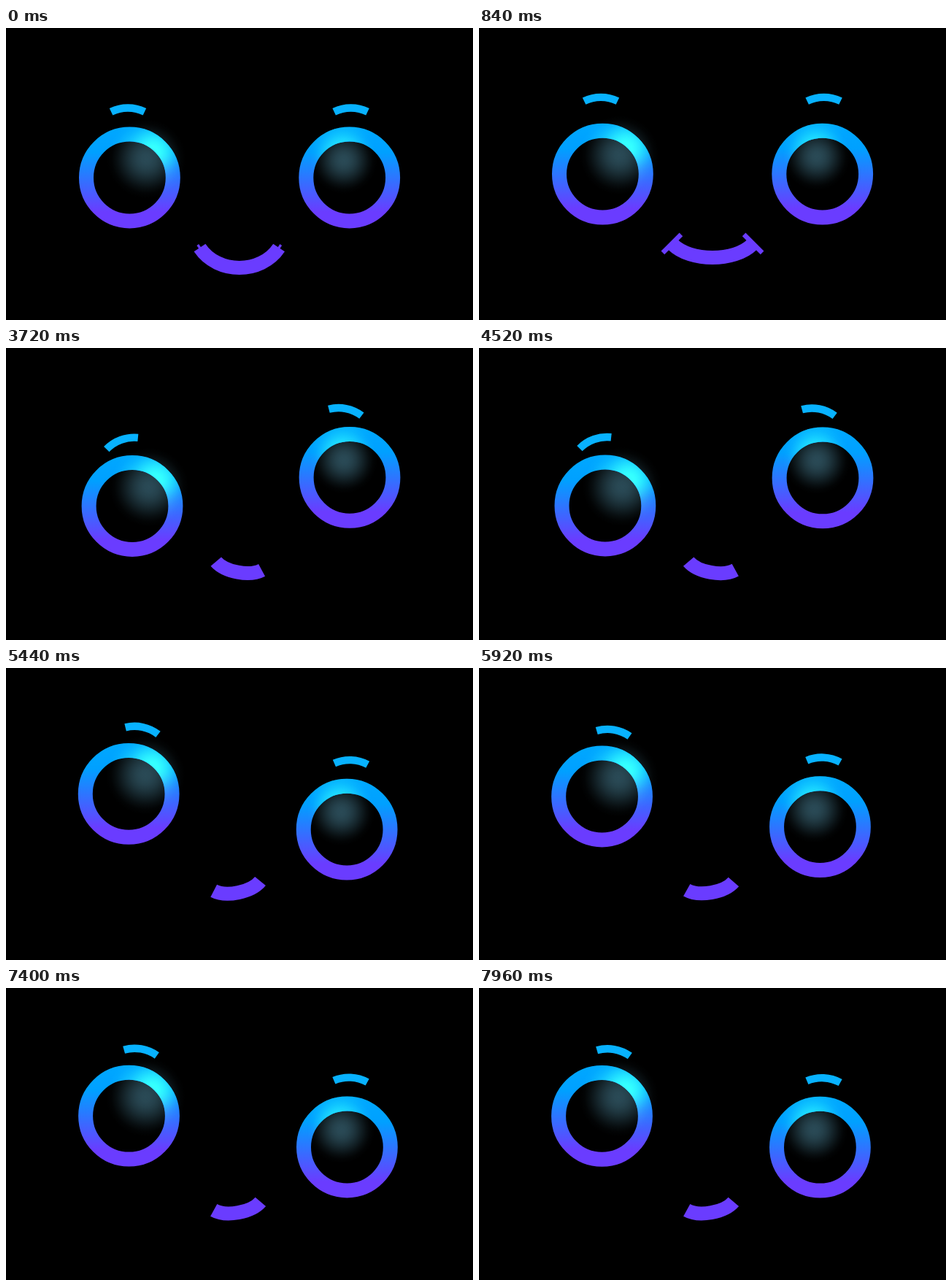
An HTML page with a canvas that plays this animation: 640 px wide and 400 px high, repeating every 8000 ms.

```html
<!DOCTYPE html>
<html lang="en">
<head>
<meta charset="utf-8">
<title>Face</title>
<style>
  html, body { margin: 0; width: 100%; height: 100%; overflow: hidden; background: #000; }
  canvas { display: block; width: 100%; height: 100%; }
</style>
</head>
<body>
<canvas id="stage" width="640" height="400"></canvas>
<script>
const ctx = document.getElementById('stage').getContext('2d');
const LOOP = 8000;
const RAD = Math.PI / 180;
const VIOLET = '#6a3cff';

// eye: x, y; brow: x, y, degrees; mouth: x, y, degrees, half width, control inset, control depth
const rest = {
  eyeL: [169.4, 205], eyeR: [470.7, 205],
  browL: [167, 110.2, 0], browR: [472.6, 110.2, 0],
  mouth: [319.8, 301, 0, 54.3, 24.5, 36.7]
};
const raised = {
  eyeL: [169.4, 200], eyeR: [470.7, 200],
  browL: [167, 95.2, 0], browR: [472.6, 95.2, 0],
  mouth: [320, 296.5, 0, 54.5, 24, 24]
};
const tiltLeft = {
  eyeL: [172.9, 216], eyeR: [471, 178],
  browL: [158, 125.5, -19.5], browR: [466, 84, 10.8],
  mouth: [319.2, 298.4, 10.2, 32.6, 15, 12.2]
};
const tiltRight = {
  eyeL: [168.5, 175.4], eyeR: [467.4, 218.2],
  browL: [185, 84.6, 9.8], browR: [472.5, 123.8, 2.8],
  mouth: [316.8, 298.6, -10.2, 32.6, 15, 12.2]
};

const clamp = v => Math.min(1, Math.max(0, v));
const cubicOut = p => 1 - (1 - p) ** 3;
function elasticOut(p) {
  if (p <= 0 || p >= 1) return p;
  return 1 + 2 ** (-10 * p) * Math.sin((p - 0.15) * 2 * Math.PI / 0.6);
}

const steps = [
  { pose: raised, at: 0, mouthEase: cubicOut, mouthTime: 800 },
  { pose: tiltLeft, at: 3120, mouthEase: elasticOut, mouthTime: 1500 },
  { pose: tiltRight, at: 5180, mouthEase: elasticOut, mouthTime: 1500 }
];

function partAt(name, t) {
  let value = rest[name];
  for (const s of steps) {
    const isMouth = name === 'mouth';
    const time = isMouth ? s.mouthTime : 1500;
    const ease = isMouth ? s.mouthEase : elasticOut;
    const k = ease(clamp((t - s.at) / time));
    value = value.map((v, i) => v + (s.pose[name][i] - v) * k);
  }
  return value;
}

function radial(x, y, r, rgb, alpha) {
  const g = ctx.createRadialGradient(x, y, 0, x, y, r);
  for (let i = 0; i <= 8; i++) {
    const d = i / 8;
    const a = alpha * (1 - d * d) ** 2;
    g.addColorStop(d, `rgba(${rgb},${a})`);
  }
  return g;
}

function eye([x, y], lift, shine, glow) {
  ctx.save();
  ctx.translate(x, y - lift);
  const g = ctx.createLinearGradient(0, -69, 0, 69);
  g.addColorStop(0, '#00a8ff');
  g.addColorStop(0.25, '#00a0ff');
  g.addColorStop(0.84, VIOLET);
  ctx.lineWidth = 20;
  ctx.beginPath();
  ctx.arc(0, 0, 59.4, 0, 2 * Math.PI);
  ctx.strokeStyle = g;
  ctx.stroke();
  ctx.strokeStyle = radial(...shine);
  ctx.stroke();
  ctx.globalCompositeOperation = 'lighter';
  ctx.fillStyle = radial(...glow);
  ctx.fillRect(-80, -90, 160, 160);
  ctx.restore();
}

function brow([x, y, deg], lift) {
  ctx.save();
  ctx.translate(x, y - lift);
  ctx.rotate(deg * RAD);
  ctx.beginPath();
  ctx.arc(0, 52.3, 52.9, -115.7 * RAD, -64.3 * RAD);
  ctx.strokeStyle = '#08b2ff';
  ctx.lineWidth = 10.4;
  ctx.stroke();
  ctx.restore();
}

function mouth([x, y, deg, half, inset, depth], dimple) {
  ctx.save();
  ctx.translate(x, y);
  ctx.rotate(deg * RAD);
  ctx.strokeStyle = ctx.fillStyle = VIOLET;
  ctx.lineWidth = 19;
  ctx.beginPath();
  ctx.moveTo(-half, 0);
  ctx.bezierCurveTo(inset - half, depth, half - inset, depth, half, 0);
  ctx.stroke();
  if (dimple > 0.05) {
    for (const side of [-1, 1]) {
      ctx.save();
      ctx.scale(side, 1);
      ctx.translate(half, 0);
      ctx.rotate(-Math.atan2(depth, inset));
      ctx.fillRect(-1.7, -dimple / 2, 6.5, dimple);
      ctx.restore();
    }
  }
  ctx.restore();
}

function draw(t) {
  ctx.fillStyle = '#000';
  ctx.fillRect(0, 0, 640, 400);

  const bob = Math.sin(Math.PI * clamp((t - 7320) / 640)) ** 2;
  const grow = cubicOut(clamp((t + 15) / 500));
  const shrink = cubicOut(clamp((t - 3090) / 500));

  eye(partAt('eyeL', t), bob * 1.2,
    [40, -43, 42, '32,220,255', 0.7], [23, -26, 54, '42,74,86', 1]);
  eye(partAt('eyeR', t), bob * 1.2,
    [-12, -50, 46, '16,200,255', 0.55], [-8, -24, 46, '42,74,86', 1]);
  brow(partAt('browL', t), bob * 3.5);
  brow(partAt('browR', t), bob * 3.5);
  mouth(partAt('mouth', t), 35.4 * grow * (1 - shrink));
}

const start = performance.now();
function tick() {
  draw((performance.now() - start) % LOOP);
  requestAnimationFrame(tick);
}
tick();
</script>
</body>
</html>
```
